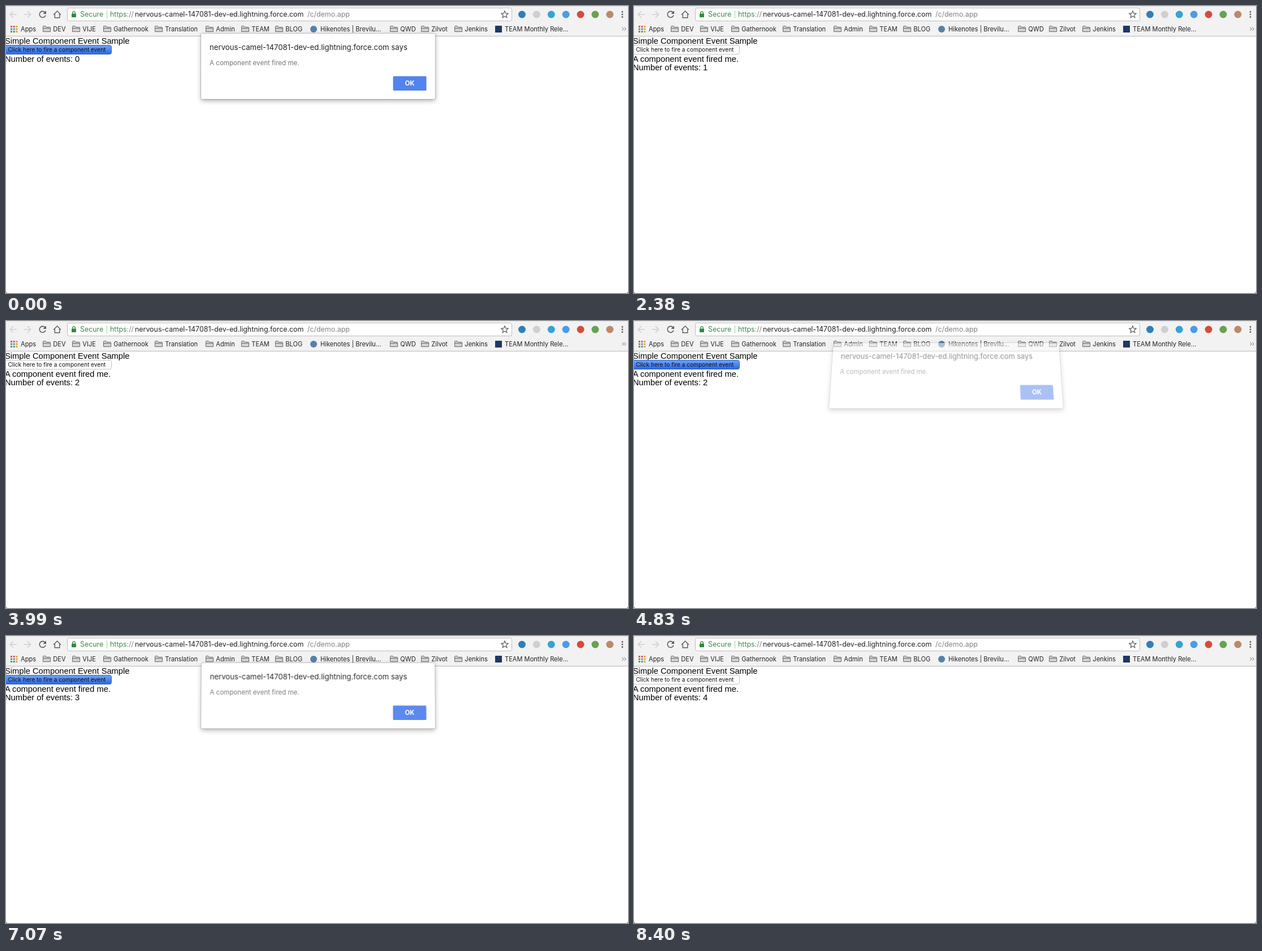
Recreate the animation shown at these times as an HTML page. Size 1100 px wide and 509 px high, loop 8.61 s.

```html
<!DOCTYPE html>
<html lang="en">
<head>
<meta charset="utf-8">
<title>Component event demo</title>
<style>
  html, body { margin: 0; width: 100%; height: 100%; overflow: hidden; background: #fff; }
  svg { position: absolute; left: 0; top: 0; }
  text { white-space: pre; }
  .ui { font-family: Inter, sans-serif; }
  .page { font: 14.7px "Liberation Sans", Arial, sans-serif; fill: #000; }
  .line { fill: none; stroke-width: 1.6; }
  #dialog {
    position: absolute; left: 345px; top: 49px; width: 414px; height: 116px;
    background: #fff; border-radius: 2px; transform-origin: 50% 100%;
    box-shadow: 0 3px 8px rgba(0,0,0,.33), 0 0 1px 1px rgba(0,0,0,.16);
  }
</style>
</head>
<body>
<svg class="ui" width="1100" height="509" viewBox="0 0 1100 509">
  <defs>
    <linearGradient id="blue" x2="0" y2="1">
      <stop offset="0" stop-color="#6ea4f8"/>
      <stop offset="1" stop-color="#2c66e4"/>
    </linearGradient>
    <g id="folder" fill="#d2d2d2" stroke="#686868">
      <path d="M.5 10.5V1.5Q.5.5 1.5.5H5L6.5 2.5H12.5Q13.5 2.5 13.5 3.5V10.5Z"/>
      <path d="M.5 4.5H13.5"/>
    </g>
  </defs>

  <rect width="1100" height="53" fill="#f2f2f2"/>
  <path d="M0 53.5H1100" stroke="#b9b9b9"/>
  <path d="M0 .5H1100" stroke="#e4e4e4"/>

  <g class="line" stroke="#d0d0d0">
    <path d="M19 15H7.5M13 9.3L7.3 15L13 20.7"/>
    <path d="M32 15H43.5M38 9.3L43.7 15L38 20.7"/>
  </g>
  <g class="line" stroke="#5a5a5a">
    <path d="M69 11.3A5.5 5.5 0 1 0 70 16.6"/>
    <path d="M71 8.5V14H65.5Z" fill="#5a5a5a" stroke="none"/>
    <path d="M84 15.5L90.5 9L97 15.5M86.2 14V20.7H94.8V14" stroke-width="1.4"/>
  </g>

  <rect x="108.5" y="3.5" width="786" height="23" rx="3" fill="#fff" stroke="#bcbcbc"/>
  <rect x="116" y="13.5" width="8" height="6.5" rx="1" fill="#2f8a3d"/>
  <path d="M117.7 14V12.2A2.3 2.3 0 0 1 122.3 12.2V14" fill="none" stroke="#2f8a3d" stroke-width="1.3"/>
  <path d="M178.5 8V22" stroke="#a9cdae"/>
  <g font-size="12.4">
    <text x="131" y="19.4" fill="#3b8a46">Secure</text>
    <text x="184" y="19.4" fill="#3b8a46">https<tspan fill="#808080">://</tspan></text>
    <text x="228" y="19.4" fill="#222">nervous-camel-147081-dev-ed.lightning.force.com</text>
    <text x="533" y="19.4" fill="#808080">/c/demo.app</text>
  </g>
  <path id="star" fill="none" stroke="#5c5c5c" stroke-width="1.2"/>
  <g id="extensions"></g>
  <g fill="#5a5a5a">
    <circle cx="1090" cy="10.5" r="1.4"/><circle cx="1090" cy="15" r="1.4"/><circle cx="1090" cy="19.5" r="1.4"/>
  </g>

  <g id="apps"></g>
  <g id="bookmarks" font-size="11.1" fill="#222"></g>
  <circle cx="544" cy="41" r="6" fill="#5581a8"/>
  <rect x="865" y="35" width="12" height="12" fill="#1f3763"/>
  <path d="M1089.5 38L1092.3 40.7L1089.5 43.4M1093.5 38L1096.3 40.7L1093.5 43.4" fill="none" stroke="#666"/>

  <text class="page" x="-2" y="66.5">Simple Component Event Sample</text>
  <rect id="button" x="-3.5" y="69.5" width="190" height="16" rx="3.5"/>
  <text x="3.5" y="81" font-size="10.1" fill="#111">Click here to fire a component event</text>
  <text id="message" class="page" x="-2" y="98.7">A component event fired me.</text>
  <text id="counter" class="page" x="-2"></text>
  <path d="M0 506V509H3Q0 509 0 506M1100 506V509H1097Q1100 509 1100 506" fill="#555"/>
</svg>

<div id="dialog">
  <svg class="ui" width="414" height="116">
    <text x="15" y="29.3" font-size="13.2" fill="#222">nervous-camel-147081-dev-ed.lightning.force.com says</text>
    <text x="15" y="56" font-size="11.6" fill="#757575">A component event fired me.</text>
    <rect x="339.5" y="75.5" width="59" height="25.5" rx="1.5" fill="#5383ec"/>
    <text x="369" y="92.3" font-size="11.5" font-weight="700" text-anchor="middle" fill="#fff">OK</text>
  </svg>
</div>

<script>
const LOOP = 8610, STEP = 70, SHOW = 180, HIDE = 150, PRESS_LEAD = 140;
// Times at which the alert starts to open and to close, in ms.
const ROUNDS = [[-1000, 980], [3125, 3750], [4740, 5850], [6899, 7810]];

const $ = id => document.getElementById(id);
const clamp = v => Math.min(1, Math.max(0, v));

const folders = [
  [65, "DEV"], [117, "VIJE"], [172, "Gathernook"], [263, "Translation"], [353, "Admin"],
  [416, "TEAM"], [476, "BLOG"], [679, "QWD"], [734, "Zilvot"], [793, "Jenkins"]
];
const links = [[26, "Apps"], [556, "Hikenotes | Brevilu..."], [882, "TEAM Monthly Rele..."]];
const label = (x, text) => `<text x="${x}" y="44.5">${text}</text>`;
$("bookmarks").innerHTML =
  folders.map(([x, text]) => `<use href="#folder" x="${x}" y="35"/>` + label(x + 18.3, text)).join("") +
  links.map(([x, text]) => label(x, text)).join("");

const dotColors = ["#d8564a", "#d8564a", "#e0a13c", "#4f9a5b", "#4a86d8", "#e0a13c", "#4f9a5b", "#4f9a5b", "#e0a13c"];
$("apps").innerHTML = dotColors.map((color, i) =>
  `<rect x="${8 + i % 3 * 4.7}" y="${35 + Math.floor(i / 3) * 4.5}" width="3" height="3" fill="${color}"/>`).join("");

const extensionColors = ["#2f7fba", "#cfcfcf", "#35a3d6", "#4a9be8", "#d84a3c", "#65a352", "#b98a6a"];
$("extensions").innerHTML = extensionColors.map((color, i) =>
  `<circle cx="${912.5 + i * 25.9}" cy="15" r="6.5" fill="${color}"/>`).join("");

const starPoints = Array.from({ length: 10 }, (_, i) => {
  const radius = i % 2 ? 2.9 : 6.5, angle = i * Math.PI / 5;
  return `${882 + radius * Math.sin(angle)} ${15.3 - radius * Math.cos(angle)}`;
});
$("star").setAttribute("d", `M${starPoints.join("L")}Z`);

function renderDialog(shown) {
  const away = 1 - shown;
  const style = $("dialog").style;
  style.visibility = shown > 0 ? "visible" : "hidden";
  style.opacity = shown;
  // Tilt backwards around the bottom side while sliding up.
  style.transform = away === 0 ? "none" :
    `translateY(${-20 * away}px) matrix3d(1,0,0,0, 0,${1 + .08 * away},0,${-.0007 * away}, 0,0,1,0, 0,0,0,1)`;
}

function render(time) {
  let shown = 0, pressed = false, count = 0;
  for (const [open, close] of ROUNDS) {
    const closed = close + HIDE;
    if (time >= closed) count++;
    else if (time >= open - PRESS_LEAD) {
      pressed = true;
      shown = Math.min(clamp((time - open) / SHOW), clamp((closed - time) / HIDE));
    }
  }
  renderDialog(shown);
  $("button").setAttribute("fill", pressed ? "url(#blue)" : "#fff");
  $("button").setAttribute("stroke", pressed ? "#3a66bd" : "#c4c4c4");
  $("message").setAttribute("visibility", count ? "visible" : "hidden");
  $("counter").setAttribute("y", count ? 113.5 : 98.7);
  $("counter").textContent = `Number of events: ${count}`;
}

function tick() {
  const time = performance.now() % LOOP;
  render(Math.floor(time / STEP) * STEP);
  requestAnimationFrame(tick);
}
tick();
</script>
</body>
</html>
```
